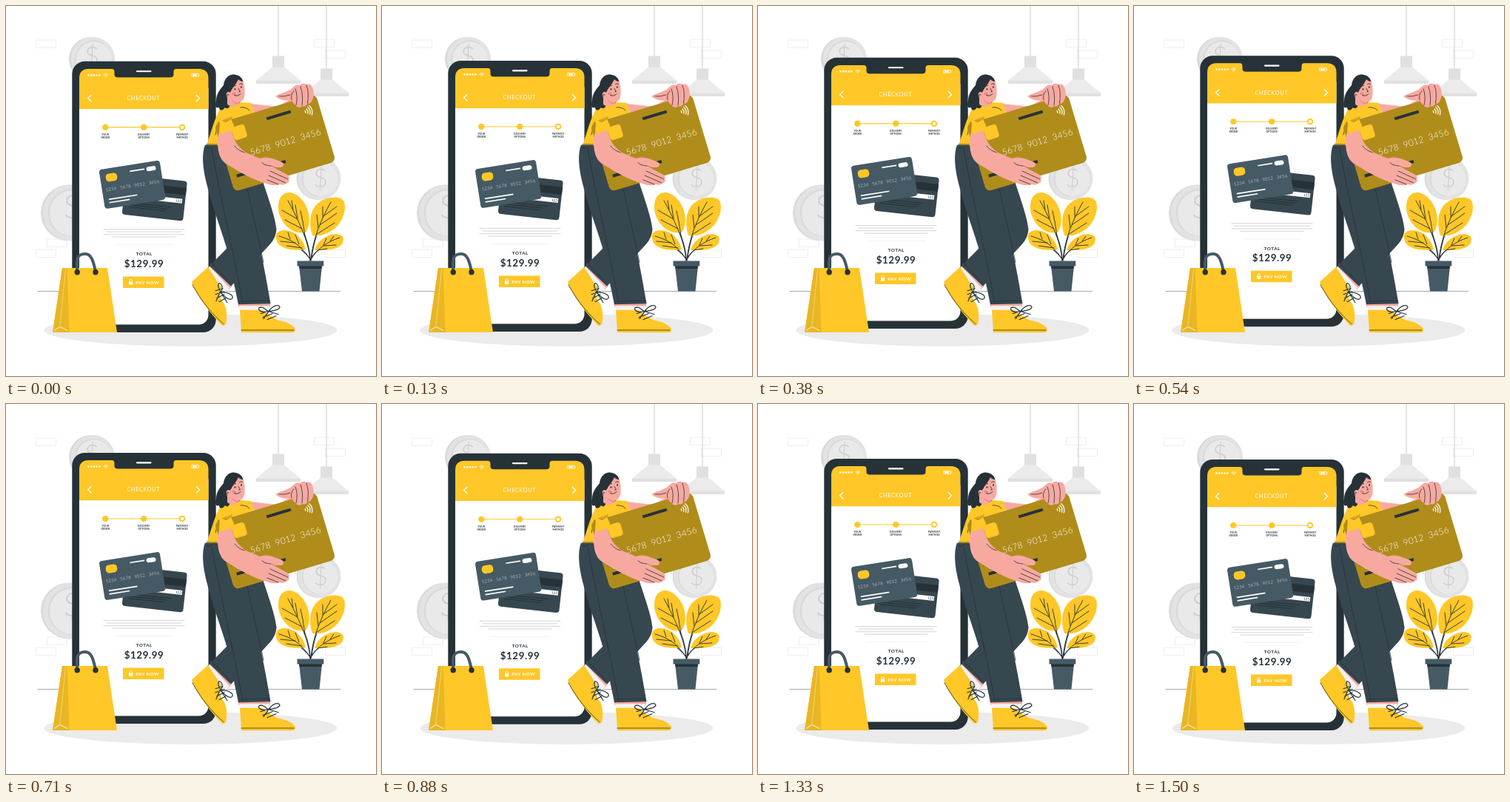
Write an HTML page with a canvas that moves like this. It is 500x500 px and loops after 1540 ms.

```html
<!DOCTYPE html>
<html lang="en">
<head>
<meta charset="utf-8">
<title>Checkout</title>
<style>
  html, body { margin: 0; width: 100%; height: 100%; overflow: hidden; background: #fff; }
  canvas { display: block; width: 500px; height: 500px; }
</style>
</head>
<body>
<canvas id="stage"></canvas>
<script>
const canvas = document.getElementById('stage');
const ctx = canvas.getContext('2d');
const ratio = window.devicePixelRatio || 1;
canvas.width = canvas.height = 500 * ratio;

const LOOP = 1540, FPS = 24;
const YELLOW = '#ffc727', INK = '#263238', SLATE = '#37474f', STEEL = '#455a64';
const SKIN = '#f7a9a0', GOLD = '#b08c1b', PALE = '#ebebeb', GREY = '#e0e0e0', WHITE = '#fff';

function fill(color, d) {
  ctx.fillStyle = color;
  ctx.fill(new Path2D(d));
}
function line(color, width, d) {
  ctx.strokeStyle = color;
  ctx.lineWidth = width;
  ctx.stroke(new Path2D(d));
}
function box(color, x, y, w, h, r = 0) {
  ctx.fillStyle = color;
  ctx.beginPath();
  ctx.roundRect(x, y, w, h, r);
  ctx.fill();
}
function oval(color, x, y, rx, ry = rx) {
  ctx.fillStyle = color;
  ctx.beginPath();
  ctx.ellipse(x, y, rx, ry, 0, 0, Math.PI * 2);
  ctx.fill();
}
function text(str, x, y, size, weight, color, spacing = 0, align = 'center', gap = 0) {
  ctx.font = `${weight} ${size}px Lato, sans-serif`;
  ctx.letterSpacing = spacing + 'px';
  ctx.wordSpacing = gap + 'px';
  ctx.textAlign = align;
  ctx.textBaseline = 'alphabetic';
  ctx.fillStyle = color;
  ctx.fillText(str, x, y);
}
function at(x, y, degrees, draw) {
  ctx.save();
  ctx.translate(x, y);
  ctx.rotate(degrees * Math.PI / 180);
  draw();
  ctx.restore();
}

function coin(x, y, r, edge, signX, signY) {
  oval('#dadada', x - edge, y, r);
  oval('#e3e3e3', x, y, r);
  oval('#d9d9d9', x + 0.5, y, r * 0.84);
  oval('#e9e9e9', x + 1.5, y + 0.5, r * 0.81);
  text('$', signX, signY + r * 0.42, r * 1.2, 300, '#cecece');
}

function lamp(x, y) {
  line('#c8c8c8', 1, `M${x} 0V${y}`);
  box(GREY, x - 8, y, 16, 16);
  fill(PALE, `M${x - 8} ${y + 15}H${x + 8}L${x + 30} ${y + 33}H${x - 30}Z`);
  box(GREY, x - 30, y + 33, 60, 4.5);
}

function background() {
  for (const [x, y] of [[41, 46], [417, 45], [432, 60], [41, 329], [56, 315], [432, 329]]) {
    line('#eeeeee', 1, `M${x} ${y}h26.5v10.5h-26.5z`);
  }
  coin(117.5, 71.5, 29.5, 3, 116, 68);
  coin(88, 279.5, 38, 3, 90, 271);
  coin(423.5, 233, 29, 2, 425, 233);
  lamp(368, 67.5);
  lamp(433, 84.5);
  line('#7d868a', 0.7, 'M43 385.5H452');
  oval(PALE, 249.5, 438, 198, 22);
}

function phoneCards() {
  ctx.lineCap = 'butt';
  at(162.5, 227.4, 6.3, () => {
    box(SLATE, 0, 0, 83, 54, 4);
    box(INK, 0, 9, 83, 10);
    box(WHITE, 36, 24.5, 43, 6);
    text('123', 74, 29.2, 4.5, 400, INK);
    line(INK, 1, 'M7 37H65M7 40H60M7 43H56');
  });
  at(125.5, 221, -9, () => {
    box(STEEL, 0, 0, 83, 53.5, 4);
    box(YELLOW, 7.5, 7, 15.5, 11, 4.5);
    line(WHITE, 1.7, 'M41 8.5H61M7 41.5H46M7 46H35');
    box(WHITE, 63.5, 6.3, 13, 6, 3);
    text('1234 5678 9012 3456', 5, 30.2, 6, 300, WHITE, 0.25, 'left', 2.7);
  });
  ctx.lineCap = 'round';
}

function phone() {
  box(INK, 89.3, 74.4, 194.4, 366.2, 17);
  box(WHITE, 99, 110, 174.5, 320, [0, 0, 13, 13]);
  fill(YELLOW, 'M99 138.800V97Q99 85 111 84.500H143Q146.500 84.500 146.500 88.500V92Q146.500 96 151 96H222Q226.500 96 226.500 92V88.500Q226.500 84.500 230 84.500H261Q273.500 85 273.500 97V138.800Z');
  line(WHITE, 2.2, 'M177 87.800H195.500');

  for (let i = 0; i < 5; i++) oval(WHITE, 111.5 + i * 3.7, 93, 1.25);
  line(WHITE, 0.9, 'M131.800 92.200Q134.800 89.700 137.800 92.200M133 93.700Q134.800 92.200 136.600 93.700');
  oval(WHITE, 134.8, 94.9, 0.7);
  line(WHITE, 0.7, 'M251 91h9v4h-9zM261 92.400v1.300');
  box(WHITE, 252, 91.9, 6, 2.2);

  line(WHITE, 1.4, 'M115 120L110.700 124.200L115 128.400M257.300 120L261.600 124.200L257.300 128.400');
  text('CHECKOUT', 185.8, 126.9, 7.3, 400, WHITE, 0.65);

  line(YELLOW, 1.2, 'M134 163.500H234');
  oval(YELLOW, 134.3, 163.5, 4.1);
  oval(YELLOW, 186.2, 163.5, 4.1);
  oval(YELLOW, 238, 163.5, 4.2);
  oval(WHITE, 238, 163.5, 2.3);
  const steps = [['YOUR', 'ORDER'], ['DELIVERY', 'OPTIONS'], ['PAYMENT', 'METHOD']];
  steps.forEach((words, i) => words.forEach((word, row) =>
    text(word, 134.3 + i * 51.9, 174.6 + row * 4.1, 3.3, 700, INK, 0.1)));

  phoneCards();

  line('#dcdcdc', 1.3, 'M132 301.200H241M136 304.700H237M132 308.100H241M144 311.600H229');
  line('#ededed', 0.7, 'M147 322H227');
  text('TOTAL', 186.7, 336.8, 6.4, 700, INK, 0.55);
  text('$129.99', 186.5, 352.3, 13.4, 700, INK, 0.55);

  box(YELLOW, 158, 365, 55.5, 15.5);
  box(WHITE, 166, 372, 5.2, 4.2, 0.5);
  line(WHITE, 0.9, 'M167 372V370.700A1.600 1.600 0 0 1 170.200 370.700V372');
  text('PAY NOW', 191.1, 375.2, 6.2, 700, WHITE, 0.35);
}

function bag() {
  fill(YELLOW, 'M76 354H137L150 441H63Z');
  fill('#e9b624', 'M76 354H82.500L85.500 441H63Z');
  line('#f6d568', 1, 'M80.500 355L73 432');
  line(WHITE, 0.9, 'M65 438.500L73 433.500L83 438.500');
  line(STEEL, 4, 'M96 359V345C97 336 102 335 107 335C115 335 118 344 121 359');
  oval(INK, 96.2, 359.8, 3.7);
  oval(INK, 121, 359.8, 3.7);
}

function plant() {
  line(INK, 1.3, 'M411 344C411 327 404 310 396 288M412 344C415 326 418 308 430 286M411 342C405 333 396 326 384 321M412 342C418 330 430 324 441 320');
  fill(YELLOW, 'M405 306C388 309 374 297 369 280C365 262 373 251 384 252C396 254 406 266 409 281C411 292 409 300 405 306Z');
  fill(YELLOW, 'M414 310C409 295 410 277 421 267C432 257 451 256 456 263C461 272 456 289 446 299C436 308 424 312 414 310Z');
  fill(YELLOW, 'M405 329C390 331 373 329 367 320C362 310 365 303 377 303C392 304 402 316 405 329Z');
  fill(YELLOW, 'M417 330C420 318 432 309 446 308C457 309 458 316 453 323C446 330 430 330 417 330Z');
  line(INK, 0.9, 'M411 344C410 323 398 294 381 263M404 311L401 291L398 277M400 301L377 289M394 287L391 269M394 288L373 276M388 275L386 263');
  line(INK, 0.9, 'M412 343C414 315 427 286 439 265M419 309L444 293M424 296L447 280M429 284L447 271M422 300L420 282M428 285L428 271');
  line(INK, 0.9, 'M411 342C401 326 388 316 369 311M400 327L379 324M391 320L371 318M396 322L391 309M384 315L381 306');
  line(INK, 0.9, 'M413 341C420 329 433 319 451 313M421 330L434 328M429 324L446 323M429 323L433 314M438 318L443 311');
  fill(STEEL, 'M396 351H427L423.500 385.500H400Z');
  fill(INK, 'M396 351H427L426.500 355H396.500Z');
  box(STEEL, 393.5, 344.5, 35.8, 7);
}

function legs() {
  // Trailing foot
  fill(SKIN, 'M278 347L306 376L301 383L273 354Z');
  fill('#f3f3f3', 'M275 351L302 380L295 388L271 358Z');
  fill(YELLOW, 'M273 352L251 372C252 381 270 408 291 430Q294 433 297 429C299 421 299 411 295 402C289 395 288 388 291 380Z');
  line(INK, 0.8, 'M252 376C263 397 279 416 294 429');
  line(INK, 1.2, 'M283 384L293 381M283 389L295 385M285 394L295 389M288 399L297 394M290 385C284 376 288 371 291 376Q294 381 290 386C303 386 309 392 305 395Q300 398 290 386L299 400M289 386L284 398');
  // Leading foot
  fill(SKIN, 'M313 400H357V406H314Z');
  fill('#f3f3f3', 'M315 404.500H356L357 412H316Z');
  fill(YELLOW, 'M316 410H345C352 413 358 420 368 424C378 426 388 429 391 436Q391 440.500 386 440.500H318Q317 424 316 410Z');
  line(INK, 0.8, 'M318 437.300H389');
  line(INK, 1.2, 'M344 415L356 411M347 420L360 415M353 423L365 418M354 412C346 404 340 406 342 410Q345 414 355 412C361 403 370 402 370 407Q367 411 355 412L368 416M355 412L348 422');
  // Trousers
  fill(SLATE, 'M327 242L347 236C353 255 364 284 365.500 301Q365 312 357 321L304 378L275 350.500L316 309Z');
  fill(SLATE, 'M269 187C264 199 266 219 271 239C279 271 290 299 298 326L314 402.500L357.500 401.500C353 374 346 338 338 300L328 230L297 185Z');
  line(INK, 0.8, 'M278 193C288 249 305 320 320 401M326 245C331 274 342 314 348 346M304 374L278 347M315 398.500L356 397.500M271 191Q277 192 280 188');
}

function head() {
  fill(INK, 'M294 107C295 97 302 92 308 92.500C316 93 320 98 321 104L316 126L303 131C303 136 300 141 296 137C292 143 288 141 288 137C283 139 282 134 284 128C284 118 290 112 294 107Z');
  fill(SKIN, 'M303 117C299 114 296 119 299 124L299 133Q307 139 315 133L314 130.500C320 130 323 124 322.500 117C323 111 322 106 320.500 102C317 102 315 100 314 99C311 106 306 110 303 117Z');
  fill('#e88e87', 'M304 126Q309 131 314 130.500L313 133Q306 131 304 126Z');
  fill('#ef817d', 'M305 118Q309 115 311 119Q308 122 305 118Z');
  oval(INK, 309.5, 112.5, 0.9, 1.2);
  oval(INK, 318, 109.5, 0.9, 1.2);
  line(INK, 0.9, 'M306.500 109.500Q308 107 310.500 107.500M315.500 105.500Q317.500 104 319.500 105.500M314 111.500L316.500 115.500L314.500 116M308.500 120.500Q313 123 317 118.500M301 120Q298 118 299 122');
}

function torso() {
  fill(SKIN, 'M329 132L367 136L386 125L390 142L340 152Z');
  fill(YELLOW, 'M289 139L300 132Q308 134 313 130L331 131L336 147L307 162L304 188H271C275 177 278 166 282 155Z');
  fill('#d5a51e', 'M288 156L306 149L304 162L288 172Z');
  line(INK, 0.8, 'M300 133Q309 138 316 130M317 137Q324 136 329 141M287 157L283 174M285 187H271');
}

function creditCard() {
  ctx.lineCap = 'butt';
  at(281.5, 160, -16.7, () => {
    box(GOLD, 0, 0, 143, 95, 7);
    box(YELLOW, 20, 10.5, 18.5, 18.5, 4);
    line(INK, 4, 'M70 13H104M9 75.500H78');
    text('1234 5678 9012 3456', 135, 54.6, 12, 300, WHITE, 0.2, 'right', 3.3);
    ctx.strokeStyle = WHITE;
    ctx.lineWidth = 1.3;
    for (const r of [3, 6, 9, 12]) {
      ctx.beginPath();
      ctx.arc(120, 19, r, -0.62, 0.62);
      ctx.stroke();
    }
  });
  ctx.lineCap = 'round';
}

function arms() {
  fill(SKIN, 'M364 122C373 117 382 116 388 110Q392 105 397 107Q401 103 406 106Q412 104 414 110C417 117 416 125 413 129Q411 133 407.500 131Q406 137 400.500 135Q396 139 392 135Q388 132 386 127Q374 130 364 122Z');
  line(INK, 0.8, 'M386 127Q384 120 389 115M391 112Q395 122 392 134M398 109Q402 120 400 134M406 107Q410 118 407.500 131M369 122Q377 123 384 120');
  fill(YELLOW, 'M289 154L288 173L306 169L308 161L304 153L297 157Z');
  fill(SKIN, 'M287 173L305 168C307 181 313 190 324 198L343 206Q350 203 360 206L373 211Q377 214 374 217Q369 220 358 216L380 228Q384 231 382 234Q384 239 379 239Q377 243 370 241Q363 244 352 240C337 236 316 225 299 214C286 207 285 189 287 173Z');
  line(INK, 0.8, 'M358 216Q351 216 346 212M357 223L381 234M355 229L378 239M353 235L368 241M322 198Q313 195 309 189');
}

function frame(now) {
  const step = Math.floor((now % LOOP + 4.9) * FPS / 1000);
  const t = step * 1000 / FPS;
  const lift = 4.5 * (1 + Math.cos(2 * Math.PI * (t - 730) / LOOP));

  ctx.setTransform(ratio, 0, 0, ratio, 0, 0);
  ctx.lineCap = ctx.lineJoin = 'round';
  ctx.fillStyle = WHITE;
  ctx.fillRect(0, 0, 500, 500);
  background();
  at(0, 0.5 - lift, 0, phone);
  bag();
  plant();
  at(0, 0.7, 0, legs);
  torso();
  head();
  creditCard();
  arms();
}

const start = performance.now();
function tick() {
  frame(performance.now() - start);
  requestAnimationFrame(tick);
}
tick();
</script>
</body>
</html>
```
